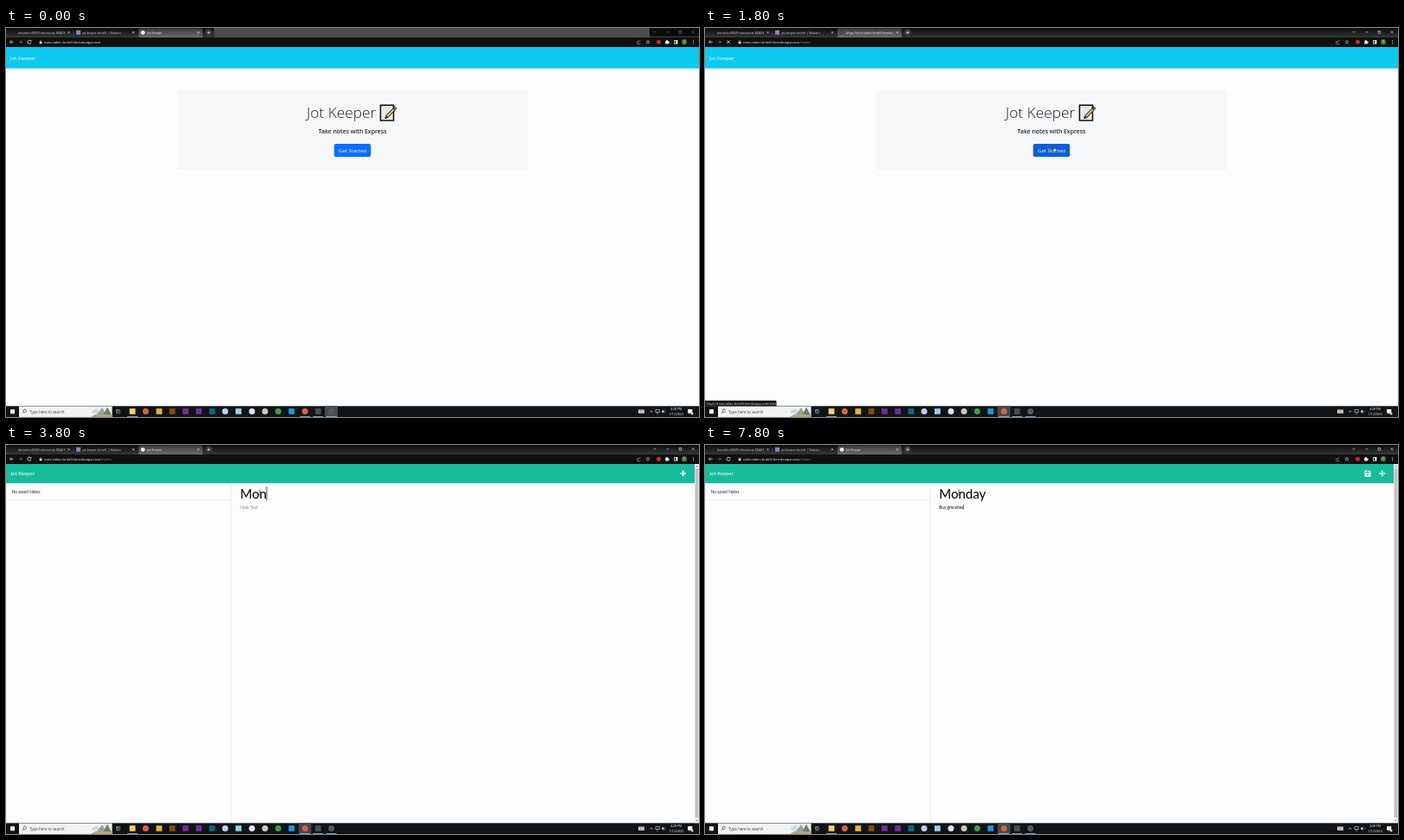
An HTML page with a canvas that plays this animation: 800 by 450 pixels, repeating every 8 s.

```html
<!DOCTYPE html>
<html lang="en">
<head>
<meta charset="utf-8">
<title>Jot Keeper</title>
<style>
html, body { margin: 0; width: 100%; height: 100%; overflow: hidden; background: #fff; }
canvas { display: block; width: 800px; height: 450px; }
</style>
</head>
<body>
<canvas id="stage"></canvas>
<script>
const LOOP = 8000, STEP = 200;
const UI = '"Open Sans", "Noto Sans", sans-serif';
const LATO = 'Lato, sans-serif';
const APP = 'Jot Keeper';
const HOST = 'note-taker-britelli.herokuapp.com';
const BAR = 437.5; // top of the taskbar
const canvas = document.getElementById('stage');
const c = canvas.getContext('2d');
const ratio = window.devicePixelRatio || 1;
canvas.width = 800 * ratio;
canvas.height = 450 * ratio;
c.scale(ratio, ratio);

function rect(x, y, w, h, fill, r = 0) {
  c.fillStyle = fill;
  c.beginPath();
  c.roundRect(x, y, w, h, r);
  c.fill();
}

function dot(x, y, r, fill) {
  c.fillStyle = fill;
  c.beginPath();
  c.arc(x, y, r, 0, Math.PI * 2);
  c.fill();
}

function ring(x, y, r, color, width, from = 0, to = Math.PI * 2) {
  c.strokeStyle = color;
  c.lineWidth = width;
  c.beginPath();
  c.arc(x, y, r, from, to);
  c.stroke();
}

function path(points, close) {
  c.beginPath();
  for (let i = 0; i < points.length; i += 2) c.lineTo(points[i], points[i + 1]);
  if (close) c.closePath();
}

function line(points, color, width = 0.7) {
  path(points);
  c.strokeStyle = color;
  c.lineWidth = width;
  c.stroke();
}

function poly(points, fill) {
  path(points, true);
  c.fillStyle = fill;
  c.fill();
}

function text(str, x, y, size, color, family = UI, weight = 400, align = 'left') {
  c.font = `${weight} ${size}px ${family}`;
  c.textAlign = align;
  c.fillStyle = color;
  c.fillText(str, x, y);
  return c.measureText(str).width;
}

function shade(y0, y1, a, b) {
  const g = c.createLinearGradient(0, y0, 0, y1);
  g.addColorStop(0, a);
  g.addColorStop(1, b);
  return g;
}

function cross(x, y, r, color, width = 0.7) {
  line([x - r, y - r, x + r, y + r], color, width);
  line([x - r, y + r, x + r, y - r], color, width);
}

function plus(x, y, r, color, width) {
  line([x - r, y, x + r, y], color, width);
  line([x, y - r, x, y + r], color, width);
}

function tabTitle(str, x, width, color) {
  c.save();
  c.beginPath();
  c.rect(x, 0, width, 11);
  c.clip();
  text(str, x, 6.5, 3.55, color);
  c.restore();
}

function drawTabs(focused, loading) {
  rect(0, 0, 800, 11, shade(0, 11, '#0b0b0b', '#373737'));
  if (!focused) {
    rect(240, 0, 503, 11, '#4b4b4b');
    rect(743, 0, 57, 9.5, '#0c0c0c');
  }
  rect(153, 0.5, 74, 11, shade(0, 11, '#3b3b3b', '#6a6a6a'), [2, 2, 0, 0]);
  tabTitle('dorvalinof58/Professional-README', 14, 54, '#c9c9c9');
  rect(81, 2.7, 5, 5, '#8f7fc0');
  tabTitle('jot-keeper-britelli | Nubaro', 88, 54, '#c9c9c9');
  if (loading) {
    ring(158, 5.3, 2, '#2a2a2a', 0.7, 0, 4.5);
    tabTitle('https://' + HOST, 163, 54, '#f2f2f2');
  } else {
    dot(158, 5.3, 2.4, '#f2f2f2');
    tabTitle(APP, 163, 54, '#f2f2f2');
  }
  for (const x of [72.5, 147, 222]) cross(x, 5.2, 1.2, '#ddd', 0.6);
  line([78, 3, 78, 8], '#555', 0.5);
  dot(234, 5.3, 4, '#3a3a3a');
  plus(234, 5.3, 1.7, '#eee', 0.7);

  const glyph = focused ? '#ddd' : '#777';
  line([747.5, 3.8, 749, 5.2, 750.5, 3.8], glyph, 0.6);
  line([762.5, 4.8, 765.5, 4.8], glyph, 0.6);
  c.strokeStyle = glyph;
  c.lineWidth = 0.6;
  c.strokeRect(777, 3.3, 2.8, 2.8);
  cross(793, 4.7, 1.5, glyph, 0.6);
}

function drawToolbar(onNotes, loading) {
  rect(0, 11, 800, 11, '#101010');
  line([8.8, 16.2, 4.6, 16.2], '#eee');
  line([6.5, 14.2, 4.5, 16.2, 6.5, 18.2], '#eee');
  line([14.4, 16.2, 18.6, 16.2], '#777');
  line([16.7, 14.2, 18.7, 16.2, 16.7, 18.2], '#777');
  if (loading) {
    cross(27, 16.2, 1.8, '#eee', 0.8);
  } else {
    ring(27, 16.2, 2, '#eee', 0.8, 0.3, 5.4);
    poly([27.6, 15.6, 29.3, 15.6, 29.3, 13.7], '#eee');
  }
  rect(38.7, 15.8, 2.8, 2.5, '#ddd', 0.3);
  ring(40.1, 15.6, 1, '#ddd', 0.5, Math.PI, 0);
  const w = text(HOST, 44, 17.7, 4.18, '#f1f1f1');
  if (onNotes) text('/notes', 44 + w, 17.7, 4.18, '#8d8d8d');

  line([729.6, 15.5, 728.6, 15.5, 728.6, 18.4, 732, 18.4, 732, 17.4], '#bbb', 0.5);
  line([730, 17, 730.5, 15, 732.6, 14.6], '#bbb', 0.5);
  const star = [];
  for (let i = 0; i < 10; i++) {
    const r = i % 2 ? 1 : 2.3, a = i * Math.PI / 5 - Math.PI / 2;
    star.push(741 + r * Math.cos(a), 16.3 + r * Math.sin(a));
  }
  path(star, true);
  c.strokeStyle = '#ccc';
  c.lineWidth = 0.5;
  c.stroke();
  dot(753.5, 16.2, 2.5, '#d9232e');
  rect(761.2, 14.9, 3.6, 3.6, '#eee', 0.4);
  dot(763, 14.6, 0.9, '#eee');
  dot(765, 16.7, 0.9, '#eee');
  rect(771, 14.1, 4.4, 4.4, '#f2f2f2', 0.4);
  rect(771.7, 14.8, 1.7, 3, '#222');
  dot(783, 16.2, 3.1, '#3d7f35');
  text('D', 783, 17.4, 3.2, '#d9ecd4', UI, 400, 'center');
  for (const y of [14.4, 16.2, 18]) dot(793.5, y, 0.5, '#eee');
}

function drawMemo() {
  rect(431.6, 88.6, 16.6, 19.2, '#16161a', 0.6);
  rect(433.2, 90.2, 13.4, 16, '#f4f5f6');
  for (let y = 92.6; y < 105; y += 2.2) line([434.8, y, 444.5, y], '#bcc1c7', 0.6);
  line([439, 103.2, 450, 91.8], '#16161a', 3.6);
  line([439.8, 102.4, 447.8, 94.1], '#f4cd62', 2);
  line([448.5, 93.3, 449.5, 92.3], '#c9b4ae', 1.7);
  poly([437.2, 105, 437.9, 102.2, 440.2, 104.4], '#16161a');
}

function drawHome(hover) {
  rect(0, 22, 800, BAR - 22, '#fdfdfe');
  rect(0, 22, 800, 24.8, '#0dcaf0');
  text(APP, 5, 37, 6.1, '#fff');
  rect(197.5, 72, 404.5, 92, '#f5f7f8', 1.5);
  text(APP, 347, 104, 17.3, '#212529', UI, 300);
  drawMemo();
  text('Take notes with Express', 400, 122.3, 6.85, '#24282c', UI, 600, 'center');
  rect(378.8, 134, 42.4, 15, hover ? '#0b5ed7' : '#0d6efd', 2);
  text('Get Started', 400, 144.1, 6.05, '#fff', UI, 400, 'center');
}

function drawSave() {
  poly([761.5, 29.5, 767.2, 29.5, 768.7, 31, 768.7, 36.8, 761.5, 36.8], '#fff');
  rect(762.5, 30.5, 4.2, 1.9, '#18bc9c');
  dot(765.1, 34.6, 1.1, '#18bc9c');
}

// One editable line: value or placeholder, then the caret.
function field(value, hint, hintColor, base, size, top, height, caret) {
  let w = 0;
  if (value) w = text(value, 270.3, base, size, '#000', LATO);
  else text(hint, 270.3, base, size, hintColor, LATO);
  if (caret) rect(270 + w, top, height > 10 ? 0.8 : 0.6, height, '#222');
}

const BODY = 'Buy groceries';
const BODY_COUNTS = [1, 2, 3, 3, 4, 4, 5, 7, 8, 10, 11, 13];

function drawNotes(t) {
  rect(0, 22, 800, BAR - 22, '#fdfdfe');
  rect(0, 22, 795, 22.3, '#18bc9c');
  text(APP, 5, 35.2, 5.86, '#fff', LATO);
  plus(781.7, 33, 3.3, '#fff', 1.6);
  if (t >= 5600) drawSave();

  rect(0, 44.3, 0.6, 393, '#e4e6e7');
  rect(0, 63.7, 260, 0.6, '#dcdfe0');
  rect(259.8, 44.3, 0.6, 393, '#e2e4e5');
  text('No saved Notes', 6.8, 56, 4.69, '#212529', LATO);

  const titleCount = Math.max(0, Math.min(6, (t - 3200) / STEP));
  const titleCaret = t === 2400 || (t >= 3200 && t < 4600);
  field('Monday'.slice(0, titleCount), 'Note Title', '#70787c', 62, 15, 48, 16, titleCaret);
  const bodyCount = t < 5600 ? 0 : BODY_COUNTS[(t - 5600) / STEP];
  const bodyCaret = (t >= 4600 && t < 5200) || t >= 5600;
  field(BODY.slice(0, bodyCount), 'Note Text', '#7b8387', 73.9, 4.69, 69, 6, bodyCaret);

  rect(795, 22, 5, BAR - 22, '#f1f1f1');
  rect(795.6, 27, 3.8, 404, '#c1c1c1');
  poly([796.3, 25.3, 798.7, 25.3, 797.5, 23.8], '#666');
  poly([796.3, 433.8, 798.7, 433.8, 797.5, 435.3], '#666');
}

function drawStatus() {
  rect(0, 431, 82.5, BAR - 431, '#151515', [0, 1, 0, 0]);
  text('https://' + HOST + '/notes', 1.5, 435.6, 3.75, '#e6e6e6');
}

// x, colour, round?
const APPS = [
  [146, '#f3cf62', 0], [161.3, '#d8604a', 1], [176.8, '#e8b437', 0], [192, '#8a480f', 0],
  [207.3, '#7a2a99', 0], [222.6, '#6c309c', 0], [238, '#0e6585', 0], [253, '#c3cdf0', 1],
  [268.4, '#8fd3ee', 0], [283.9, '#dce6ee', 1], [299, '#c9cbb8', 1], [314.3, '#3f9f45', 1],
  [329.7, '#2595df', 0], [345.2, '#d8604a', 1], [360.3, '#4a4d50', 0], [375.6, '#55595c', 1]
];

function drawTaskbar(chromeActive) {
  rect(0, BAR, 800, 450 - BAR, '#101417');
  rect(5, 441.2, 5, 5, '#f5f5f5');
  rect(15, 437.8, 107.5, 12.2, '#f1f2f2');
  ring(21.7, 442.9, 1.7, '#222', 0.6);
  line([20.5, 444.2, 18.7, 446], '#222', 0.6);
  text('Type here to search', 27, 445.5, 4.45, '#444');

  c.save();
  c.beginPath();
  c.rect(98, 437.8, 24.5, 12.2);
  c.clip();
  for (const [x, y, r] of [[101, 444, 2], [104, 443, 2.5], [107, 445, 2]]) dot(x, y, r, '#c3dbe6');
  poly([103, 450, 111, 439, 117, 450], '#8fa39c');
  poly([111, 450, 117, 438.5, 123, 450], '#6e8069');
  poly([98, 450, 104, 446.5, 123, 447.5, 123, 450], '#b9a67d');
  c.restore();

  line([127.4, 441.4, 131.6, 441.4], '#ccc', 0.5);
  line([127.4, 445.8, 131.6, 445.8], '#ccc', 0.5);
  c.strokeStyle = '#ccc';
  c.lineWidth = 0.5;
  c.strokeRect(127.6, 442.5, 2.4, 2.2);
  line([131.4, 442.3, 131.4, 445], '#ccc', 0.5);
  if (chromeActive) rect(337.7, BAR, 14.8, 450 - BAR, '#42494c');
  else rect(368, BAR, 15, 450 - BAR, '#474c4e');
  for (const [x, color, round] of APPS) {
    if (round) dot(x, 443.5, 3.5, color);
    else rect(x - 3.4, 440.2, 6.8, 6.6, color);
  }
  for (const x of [146, 345.2, 360.3, 375.6]) rect(x - 6, 449.2, 12, 0.8, '#84bfe8');

  rect(730, 441.4, 7, 4.4, '#dedede', 0.4);
  for (const y of [442.5, 443.8]) {
    for (let x = 731; x < 736.5; x += 1.3) rect(x, y, 0.6, 0.6, '#222');
  }
  line([743.2, 444.4, 744.8, 442.8, 746.4, 444.4], '#eee', 0.7);
  c.strokeStyle = '#ddd';
  c.lineWidth = 0.6;
  c.strokeRect(750, 441.7, 4.2, 3);
  line([751, 446, 753.2, 446], '#ddd', 0.6);
  poly([757, 442.8, 758, 442.8, 759.4, 441.5, 759.4, 445.8, 758, 444.6, 757, 444.6], '#ddd');
  ring(759.4, 443.7, 1.8, '#bbb', 0.5, -0.8, 0.8);
  text('4:28 PM', 773.7, 442.2, 3.5, '#f3f3f3', UI, 400, 'center');
  text('1/12/2023', 773.7, 448, 3.5, '#f3f3f3', UI, 400, 'center');
  rect(787, 441, 5.3, 4.4, '#f3f3f3', 0.4);
  poly([788.5, 445, 790.3, 445, 788.5, 446.8], '#f3f3f3');
  dot(792, 446, 1.5, '#d4d4d4');
}

const ROUTE = [[200, 764, 5], [1200, 324, 109.5], [1600, 402, 138], [1800, 403, 138],
  [2000, 377.5, 132], [2400, 293, 55]];

function pointer(t) {
  const next = ROUTE.findIndex(p => p[0] >= t);
  if (next < 0) return ROUTE[ROUTE.length - 1].slice(1);
  const b = ROUTE[next], a = ROUTE[Math.max(0, next - 1)];
  const u = b === a ? 0 : (t - a[0]) / (b[0] - a[0]);
  const e = u * u * (3 - 2 * u);
  return [a[1] + (b[1] - a[1]) * e, a[2] + (b[2] - a[2]) * e];
}

function drawPointer(t) {
  if (t < 400) return;
  const [x, y] = pointer(t);
  c.save();
  c.translate(x, y);
  if (t >= 2000) {
    line([0, -2.8, 0, 2.8], '#333', 0.6);
    line([-1.1, -3, 1.1, -3], '#333', 0.5);
    line([-1.1, 3, 1.1, 3], '#333', 0.5);
  } else {
    if (t >= 1600) path([-0.4, 0, 0.4, 0, 0.5, 1.6, 2.3, 2.2, 2, 4.8, -0.6, 4.8, -1.7, 2.8, -0.4, 3], true);
    else path([0, 0, 0, 5, 1.1, 4, 1.9, 5.8, 2.7, 5.4, 1.9, 3.7, 3.5, 3.6], true);
    c.fillStyle = '#fff';
    c.fill();
    c.strokeStyle = '#222';
    c.lineWidth = 0.5;
    c.stroke();
  }
  c.restore();
}

function draw(t) {
  const onNotes = t >= 2000, loading = t === 1800, focused = t >= 1800;
  if (onNotes) drawNotes(t);
  else drawHome(t >= 1600);
  drawTabs(focused, loading);
  drawToolbar(focused, loading);
  if (t >= 1600 && t < 2200) drawStatus();
  drawTaskbar(focused);
  drawPointer(t);
}

const start = performance.now();
function frame() {
  const t = (performance.now() - start) % LOOP;
  draw(Math.floor(t / STEP) * STEP);
  requestAnimationFrame(frame);
}
frame();
</script>
</body>
</html>
```
